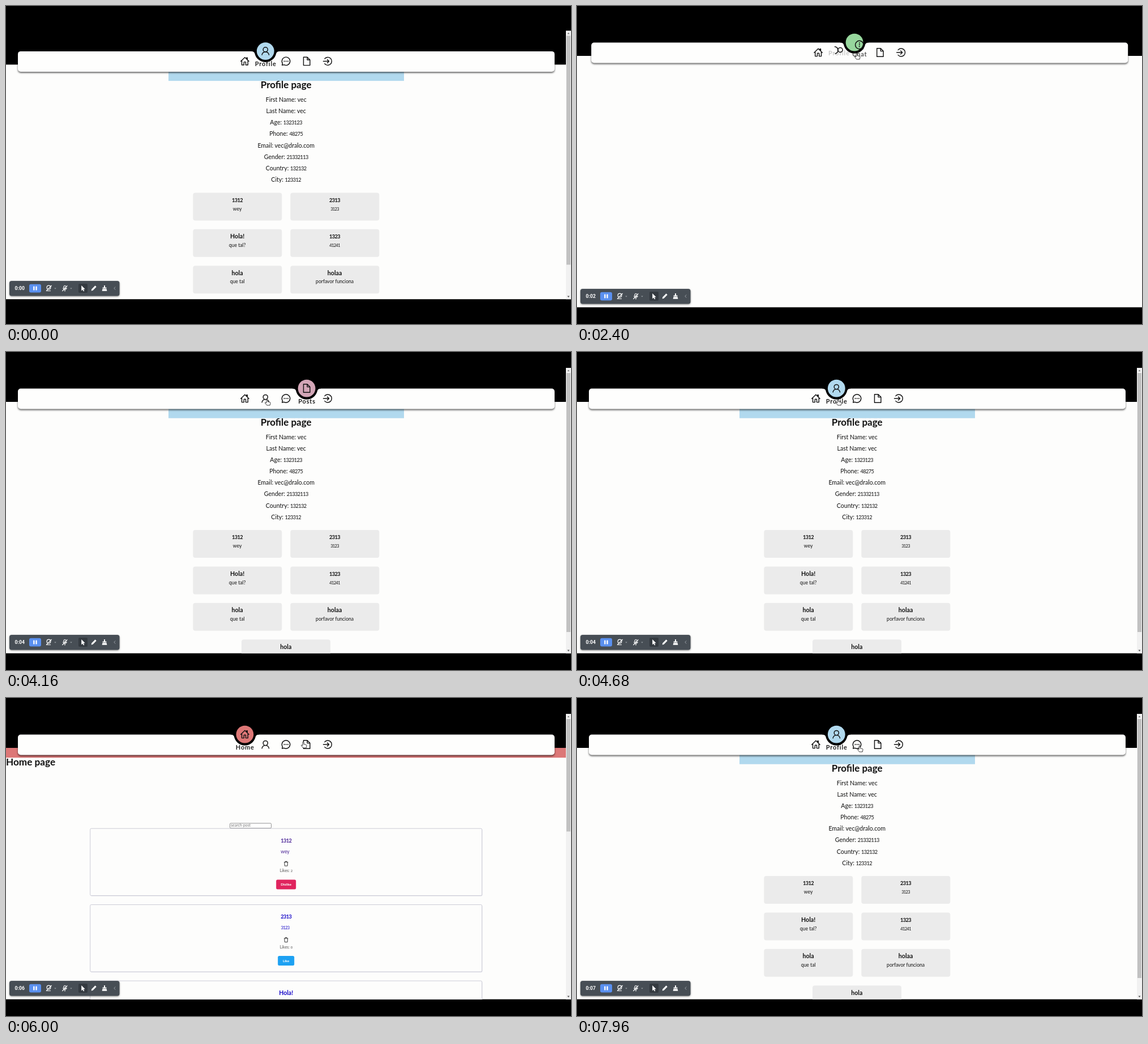
An HTML page for the animation above (8000 ms loop, 998 by 561 pixels).

```html
<!DOCTYPE html>
<html lang="en">
<head>
<meta charset="utf-8">
<title>Profile page</title>
<style>
html, body { margin: 0; width: 100%; height: 100%; overflow: hidden; background: #000; }
svg { display: block; width: 998px; height: 561px; font-family: Lato, "Open Sans", sans-serif; }
.num { font-size: .87em; letter-spacing: -.6px; }
.bar { filter: drop-shadow(0 2px 1.5px rgba(0, 0, 0, .6)); }
.tool { filter: drop-shadow(0 1px 1.5px rgba(0, 0, 0, .45)); }
.line { fill: none; stroke: #111; stroke-width: 1.45; stroke-linecap: round; stroke-linejoin: round; }
.label { letter-spacing: .8px; }
</style>
</head>
<body>
<svg id="stage" viewBox="0 0 998 561" xmlns="http://www.w3.org/2000/svg"></svg>
<script>
const LOOP = 8000, MOVE = 500, MID = 494.7;
const PAPER = '#fdfdfc';

const rect = (x, y, w, h, fill, r = 0, extra = '') =>
  `<rect x="${x}" y="${y}" width="${w}" height="${h}" rx="${r}" fill="${fill}" ${extra}/>`;

const text = (x, y, str, size, { fill = '#111', bold = false, anchor = 'middle', extra = '' } = {}) =>
  `<text x="${x}" y="${y}" font-size="${size}" fill="${fill}" font-weight="${bold ? 700 : 400}"
    text-anchor="${anchor}" ${extra}>${str.replace(/\d+/g, '<tspan class="num">$&</tspan>')}</text>`;

const bold = { bold: true };

/* ---- pages ---- */
function profilePage() {
  const lines = ['First Name: vec', 'Last Name: vec', 'Age: 1323123', 'Phone: 48275',
    'Email: vec@dralo.com', 'Gender: 21332113', 'Country: 132132', 'City: 123312'];
  const cards = [['1312', 'wey'], ['2313', '3123'], ['Hola!', 'que tal?'], ['1323', '41241'],
    ['hola', 'que tal'], ['holaa', 'porfavor funciona'], ['hola', '']];
  let out = rect(287, 88, 416, 28.7, '#b1d9ee') + text(MID, 130, 'Profile page', 17, bold);
  lines.forEach((s, i) => out += text(MID, 153.6 + i * 20.15, s, 10.6));
  cards.forEach(([head, sub], i) => {
    const x = i === 6 ? 416 : 330.3 + (i % 2) * 172, y = 314 + (i >> 1) * 64.4;
    out += rect(x, y, 157, 49, '#ebebeb', 4)
      + text(x + 78.3, y + 16.4, head, 10.6, bold)
      + text(x + 78.3, y + 31.3, sub, 8.6);
  });
  return out;
}

function homePage() {
  const posts = [
    ['1312', 'wey', 2, 'Dislike', '#e0245e', 35, '#4a2396'],
    ['2313', '3123', 0, 'Like', '#1da1f2', 29, '#1708c8'],
    ['Hola!', '', 0, 'Like', '#1da1f2', 29, '#1708c8']];
  let out = rect(0, 88, 989, 17.3, '#dc7777')
    + text(0, 118.6, 'Home page', 17.2, { bold: true, anchor: 'start' })
    + rect(395.5, 221, 73, 8.6, '#fff', 1.5, 'stroke="#777" stroke-width=".8"')
    + text(397, 227.4, 'search post', 7, { fill: '#777', anchor: 'start' });
  posts.forEach(([head, sub, likes, label, tint, w, ink], i) => {
    const y = 230.2 + i * 134.4;
    out += rect(149.5, y + 1, 692, 118.4, '#e4e4ec', 2)
      + rect(148.7, y, 692, 118.4, PAPER, 2, 'stroke="#bfbfcd" stroke-width=".8"')
      + text(MID, y + 24.6, head, 10.6, { bold: true, fill: ink })
      + text(493, y + 43.4, sub, 8.6, { fill: ink })
      + `<path transform="translate(${MID} ${y + 62})" fill="none" stroke="#222" stroke-width=".9"
          d="M-3.6-2.6H3.6M-1.3-2.6V-4H1.3V-2.6M-2.8-2.6L-2.4 4H2.4L2.8-2.6"/>`
      + text(MID, y + 77, 'Likes: ' + likes, 7, { fill: '#555' })
      + rect(MID - w / 2, y + 90.4, w, 17, tint, 2.5)
      + text(MID, y + 101.2, label, 6.4, { bold: true, fill: '#fff' });
  });
  return out;
}

/* ---- navigation ---- */
const tabs = [
  { name: 'Home', tint: [221, 119, 118],
    icon: '<path d="M-5.4-1.4V6.6H-1.6V2Q-1.6 1.2-.8 1.2H.8Q1.6 1.2 1.6 2V6.6H5.4V-1.4M-7.2.2L0-6.7L7.2.2M4.4-2.6V-6.2H3V-4"/>' },
  { name: 'Profile', tint: [177, 217, 238],
    icon: '<circle cy="-2.5" r="4.1"/><path d="M-6.2 6.8A6.3 6.3 0 0 1 6.2 6.8"/>' },
  { name: 'Chat', tint: [143, 215, 131],
    icon: '<path d="M-6.2 3.9A7.2 7.2 0 1 1-3.6 6.3L-7 7Z"/><path stroke-width="2" d="M-3.2 0h.01M0 0h.01M3.2 0h.01"/>' },
  { name: 'Posts', tint: [211, 166, 183],
    icon: '<path d="M-5.6-7.2H1L5.8-2.4V7.2H-5.6ZM1-7.2V-2.4H5.8"/>' },
  { name: '', tint: [0, 0, 0],
    icon: '<path d="M-4.6-4.4A7 7 0 1 1-4.6 4.4M-7 0H3M0-3L3 0L0 3"/>' }];
const tabX = i => 421.9 + i * 36.4;

function navBar() {
  return rect(21, 64.5, 948, 36, '#fefefd', 5, 'class="bar"')
    + `<g id="bubble"><path d="M-25-1V0Q-19.4 0-18.6 5A19.3 19.3 0 0 0 18.6 5Q19.4 0 25 0V-1Z" fill="#000"/>
       <circle id="disc" cy="-.3" r="15.4"/></g>`
    + tabs.map((tab, i) => text(0, 0, tab.name, 11, { bold: true, fill: '#222', extra: `class="label" id="label${i}"` })
      + `<g class="line" id="icon${i}">${tab.icon}</g>`).join('');
}

/* ---- recorder panel ---- */
function toolPanel() {
  const w = 'stroke="#fff" fill="none" stroke-width="1.2"';
  const caret = x => `<path d="M${x} 511.5h3.4l-1.7 2z" fill="#9aa0a6"/>`;
  return rect(6, 499, 194.5, 26.6, '#474e55', 4, 'class="tool"')
    + `<text id="clock" x="15.6" y="515.2" font-size="8.7" font-weight="700" fill="#fff" font-family="Roboto, sans-serif"></text>`
    + rect(41, 504.8, 21, 14.6, '#5a90f0', 3)
    + rect(48.2, 508.6, 2.3, 7, '#fff', .5) + rect(52.4, 508.6, 2.3, 7, '#fff', .5)
    + `<circle cx="75.5" cy="510.6" r="3.4" ${w}/><path d="M72 516.5H79M71 516.8L80.6 507" ${w}/>`
    + caret(85.3)
    + `<path d="M102.2 508.5Q104 506 105.8 508.5V511.5Q104 514 102.2 511.5ZM100.4 511.5Q104 517.5 107.6 511.5M104 515V517.4M99.4 517L108.4 507.3" ${w}/>`
    + caret(113.3)
    + rect(128, 504, 16, 16, '#343a40', 2)
    + `<path d="M133.2 507v9.4l2.1-1.9 1.6 3 1.5-.8-1.5-2.9 2.8-.3z" fill="#fff"/>
       <path d="M150.6 516.4l.7-2.9 6.2-6.2 2.2 2.2-6.2 6.2z" fill="#fff"/>
       <path d="M173 507h2v3.4h2.4v2h-6.8v-2h2.4zM170.4 513.2h7.2l.8 3.6h-8.8z" fill="#fff"/>
       <path d="M193.2 509.4l-2.4 2.6 2.4 2.6" fill="none" stroke="#9aa0a6" stroke-width="1"/>`;
}

const pointers = `<path id="arrow" d="M0 0V10.2L2.3 8L4 11.8L5.7 11L4 7.4H7.1Z" fill="#000" stroke="#fff" stroke-width=".6"/>
  <path id="hand" d="M-1 1Q0-.6 1 1V4.6L5 5.4Q6.2 5.8 6 7.2L5.2 11H-.2L-3.4 7Q-3.6 5.6-2.2 6L-1 7Z" fill="#fff" stroke="#111" stroke-width=".8"/>`;

document.getElementById('stage').innerHTML = `
  <clipPath id="view"><rect id="viewBox" width="998"/></clipPath>
  <rect width="998" height="561"/>
  <g clip-path="url(#view)">
    <g id="page">
      ${rect(0, 88, 998, 480, PAPER)}
      <g id="profile">${profilePage()}</g>
      <g id="home">${homePage()}</g>
      <g id="scroll">
        ${rect(989, 28, 9, 540, '#f1f1f1')}
        ${rect(990, 37, 7, 0, '#c1c1c1', 0, 'id="thumb"')}
        <path d="M991.5 34h4l-2-2.6z" fill="#777"/>
        <path id="down" d="M991.5 525.6h4l-2 2.6z" fill="#555"/>
      </g>
      <g id="nav">${navBar()}</g>
    </g>
    <g id="panel">${toolPanel()}</g>
  </g>
  <g id="pointer">${pointers}</g>`;

/* ---- timing ---- */
const pages = [[0, 'profile'], [2000, 'blank'], [4080, 'profile'], [5120, 'home'], [6220, 'blank'], [7130, 'profile']];
const moves = [[-999, 1, 1], [2172, 1, 2], [3000, 2, 3], [4190, 3, 1], [5216, 1, 0], [6340, 0, 3], [7250, 3, 1]];
const path = [[400, 760, 330], [860, 632, 196], [920, 632, 196], [1060, 674, 176], [1460, 494, 83], [2640, 494, 83],
  [2860, 533, 84], [3640, 533, 84], [3980, 461, 83], [4700, 461, 83], [5040, 416, 76], [5320, 416, 76],
  [5780, 525, 77], [6940, 525, 77], [7090, 461, 83], [7440, 461, 83], [7880, 499, 84]];

const $ = id => document.getElementById(id);
const set = (id, key, val) => $(id).setAttribute(key, val);
const show = (id, on) => set(id, 'display', on ? 'inline' : 'none');
const clamp = v => Math.min(1, Math.max(0, v));
const mix = (a, b, p) => a + (b - a) * p;
const smooth = p => p * p * (3 - 2 * p);
const latest = (list, t) => list.filter(row => row[0] <= t).pop();

// cubic-bezier(.25, .1, .25, 1)
function ease(x) {
  if (x <= 0 || x >= 1) return clamp(x);
  const curve = (s, a, b) => 3 * (1 - s) ** 2 * s * a + 3 * (1 - s) * s * s * b + s ** 3;
  let lo = 0, hi = 1;
  for (let i = 0; i < 20; i++) {
    const s = (lo + hi) / 2;
    if (curve(s, .25, .25) < x) lo = s; else hi = s;
  }
  return curve(lo, .1, 1);
}

function drawNav(t, shift) {
  const [start, from, to] = latest(moves, t), p = ease((t - start) / MOVE);
  set('nav', 'transform', `translate(${shift} 0)`);
  set('bubble', 'transform', `translate(${mix(tabX(from), tabX(to), p)} 64.5)`);
  const rgb = tabs[from].tint.map((c, i) => Math.round(mix(c, tabs[to].tint[i], p)));
  set('disc', 'fill', `rgb(${rgb})`);
  tabs.forEach((tab, i) => {
    const level = i === to ? p : i === from ? 1 - p : 0;
    set('icon' + i, 'transform', `translate(${tabX(i)} ${82 - 18 * level}) rotate(${360 * level})`);
    set('label' + i, 'transform', `translate(${tabX(i) + .4} ${mix(85.6, 90.6, level)})`);
    set('label' + i, 'opacity', level);
  });
}

function drawPointer(t) {
  const a = latest(path, t);
  show('pointer', !!a);
  if (!a) return;
  const b = path[path.indexOf(a) + 1] || a;
  const p = a === b ? 0 : smooth((t - a[0]) / (b[0] - a[0]));
  const x = mix(a[1], b[1], p), y = mix(a[2], b[2], p);
  set('pointer', 'transform', `translate(${x} ${y})`);
  show('hand', y < 100);
  show('arrow', y >= 100);
}

function draw(t) {
  const page = latest(pages, t)[1];
  const inset = 1 - smooth(clamp((t - 80) / 240));
  set('viewBox', 'y', 28 + 15.2 * inset);
  set('viewBox', 'height', 503.4 - 29.4 * inset);
  set('page', 'transform', `translate(0 ${15.4 * inset})`);
  set('panel', 'transform', `translate(0 ${-14 * inset})`);
  show('profile', page === 'profile');
  show('home', page === 'home');
  show('scroll', page !== 'blank');
  set('thumb', 'height', page === 'home' ? 198.5 : 457 - 53 * inset);
  set('down', 'transform', `translate(0 ${-29.4 * inset})`);
  drawNav(t, page === 'blank' ? 4.2 : 0);
  drawPointer(t);
  $('clock').textContent = '0:0' + Math.floor(t / 1000);
}

const begin = performance.now();
function tick() {
  draw((performance.now() - begin) % LOOP);
  requestAnimationFrame(tick);
}
draw(0);
requestAnimationFrame(tick);
</script>
</body>
</html>
```
